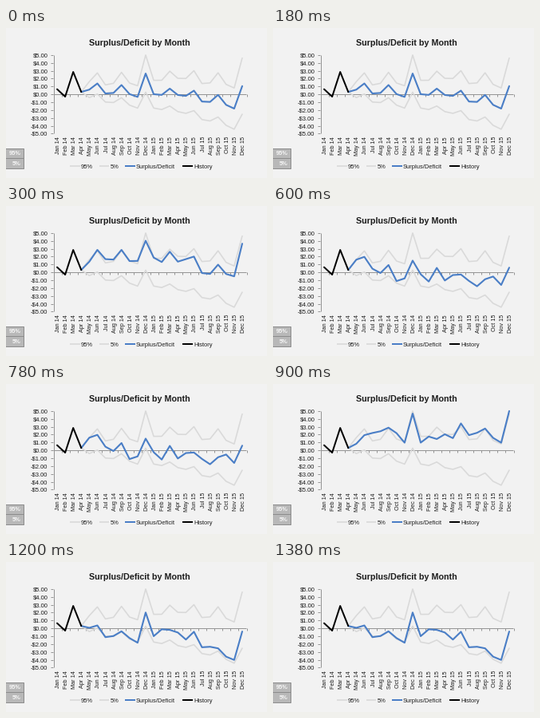
These frames come from a looping animation (327 by 188 pixels, 1500 ms). A matplotlib script:

```python
import numpy as np
import matplotlib.pyplot as plt
from matplotlib.animation import FuncAnimation
from matplotlib.patches import Rectangle

W, H, DPI = 327, 188, 100
PT = 72 / DPI
FONT = "Liberation Sans"
BG, INK, AXIS, BAND, BLUE = "#f2f2f2", "#1c1c1c", "#959595", "#d9d9d9", "#4a7ec6"
LEFT, RIGHT, ZERO, UNIT = 59, 301, 83.1, 9.85
STEP = (RIGHT - LEFT) / 24
MONTHS = "Jan Feb Mar Apr May Jun Jul Aug Sep Oct Nov Dec".split()

# Forecast: a yearly profile on a falling trend, with a widening band
history = [0.65, -0.3, 2.85, 0.3]
season = [0.4, 0.4, 1.3, 0.6, 0.6, 1.4, 0.15, 0.25, 1.3, 0.2, -0.1, 2.95]
ahead = np.arange(1, 21)
profile = np.take(season, (ahead + 3) % 12)
mean = profile - ahead**2 / 210
spread = 0.75 + 0.1 * ahead + 0.28 * profile
zigzag = (-1.0) ** ahead * np.sin(np.pi * ahead / 20) ** 2


def scenario(months, offsets, wobble):
    return mean + np.interp(ahead, months, offsets) + wobble * zigzag


runs = [
    mean,
    scenario([0, 2, 14, 15, 19, 20], [0, 1.5, 1.7, 0.7, 1.3, 2.6], -0.25),
    scenario([1, 6, 15, 17, 18, 20], [1, -0.85, -0.4, -0.9, 0.85, -0.45], -0.45),
    scenario([0, 2, 3, 11, 15, 19, 20], [0, 0.5, 2.2, 1.2, 3.1, 2.8, 4], 0.5),
    scenario([0, 2, 6, 10, 16, 17, 19, 20],
             [0, -1.05, -1.5, -0.4, -1.5, -2.4, -2.2, -1.45], 0.35),
]

fig = plt.figure(figsize=(W / DPI, H / DPI), dpi=DPI, facecolor=BG)
ax = fig.add_axes([0, 0, 1, 1])
ax.set_xlim(0, W)
ax.set_ylim(H, 0)
ax.axis("off")


def label(x, y, text, size=7.7, **style):
    style = {"color": INK, "va": "center_baseline", **style}
    return ax.text(x, y, text, fontsize=size * PT, family=FONT, **style)


def stroke(xs, ys, color, width=1, z=2, cap="butt"):
    return ax.plot(xs, ys, color=color, lw=width * PT, zorder=z,
                   solid_capstyle=cap, solid_joinstyle="round")[0]


def month_x(i):
    return LEFT + STEP * (i + 0.5)


def value_y(v):
    return ZERO - UNIT * np.minimum(v, 5)


def forecast_y(values):
    return value_y(np.append(history[-1], values))


def series(ys, first, color, width, z):
    xs = month_x(first + np.arange(len(ys)))
    return stroke(xs, ys, color, width, z, cap="round")


def draw_axes():
    stroke([LEFT + 0.5] * 2, [value_y(5), value_y(-5)], AXIS)
    stroke([LEFT, RIGHT], [ZERO, ZERO], AXIS)
    for v in range(5, -6, -1):
        y = value_y(v)
        stroke([LEFT - 3, LEFT], [y, y], AXIS)
        sign = "-" if v < 0 else ""
        label(52.5, y, f"{sign}${abs(v)}.00", ha="right")
    for i in range(25):
        x = LEFT + 0.5 + STEP * i
        stroke([x, x], [ZERO, ZERO + 3], AXIS)
    for i in range(24):
        label(month_x(i) + 0.5, 136, f"{MONTHS[i % 12]} {14 + i // 12}", 7.3,
              rotation=90, rotation_mode="anchor", ha="right")


def draw_legend():
    y = 173
    entries = [(80, "95%", BAND, 1.6), (116.5, "5%", BAND, 1.6),
               (149, "Surplus/Deficit", BLUE, 2), (221, "History", "black", 2)]
    for x, name, color, width in entries:
        stroke([x, x + 12.5], [y, y], color, width)
        label(x + 14, y, name, 7.5)


def draw_cells():
    for y, name in [(150.5, "95%"), (163, "5%")]:
        ax.add_patch(Rectangle((-1, y), 22.5, 12.5, fc="#b8b8b8",
                               ec="#8c8c8c", lw=PT))
        label(19, y + 6.3, name, 7.5, color="#f5f5f5", weight="bold", ha="right")


label(167, 18, "Surplus/Deficit by Month", 10.7, weight="bold", ha="center")
draw_axes()
draw_legend()
draw_cells()

for edge in (mean + spread, mean - spread):
    series(forecast_y(edge), 3, BAND, 1.6, 3)
balance = series(forecast_y(runs[0]), 3, BLUE, 2.1, 4)
series(value_y(history), 0, "black", 2, 5)


def update(i):
    balance.set_ydata(forecast_y(runs[i]))
    return [balance]


def reset():
    return update(0)


anim = FuncAnimation(fig, update, frames=len(runs), init_func=reset,
                     interval=300, repeat=True, blit=False)
plt.show()
```
